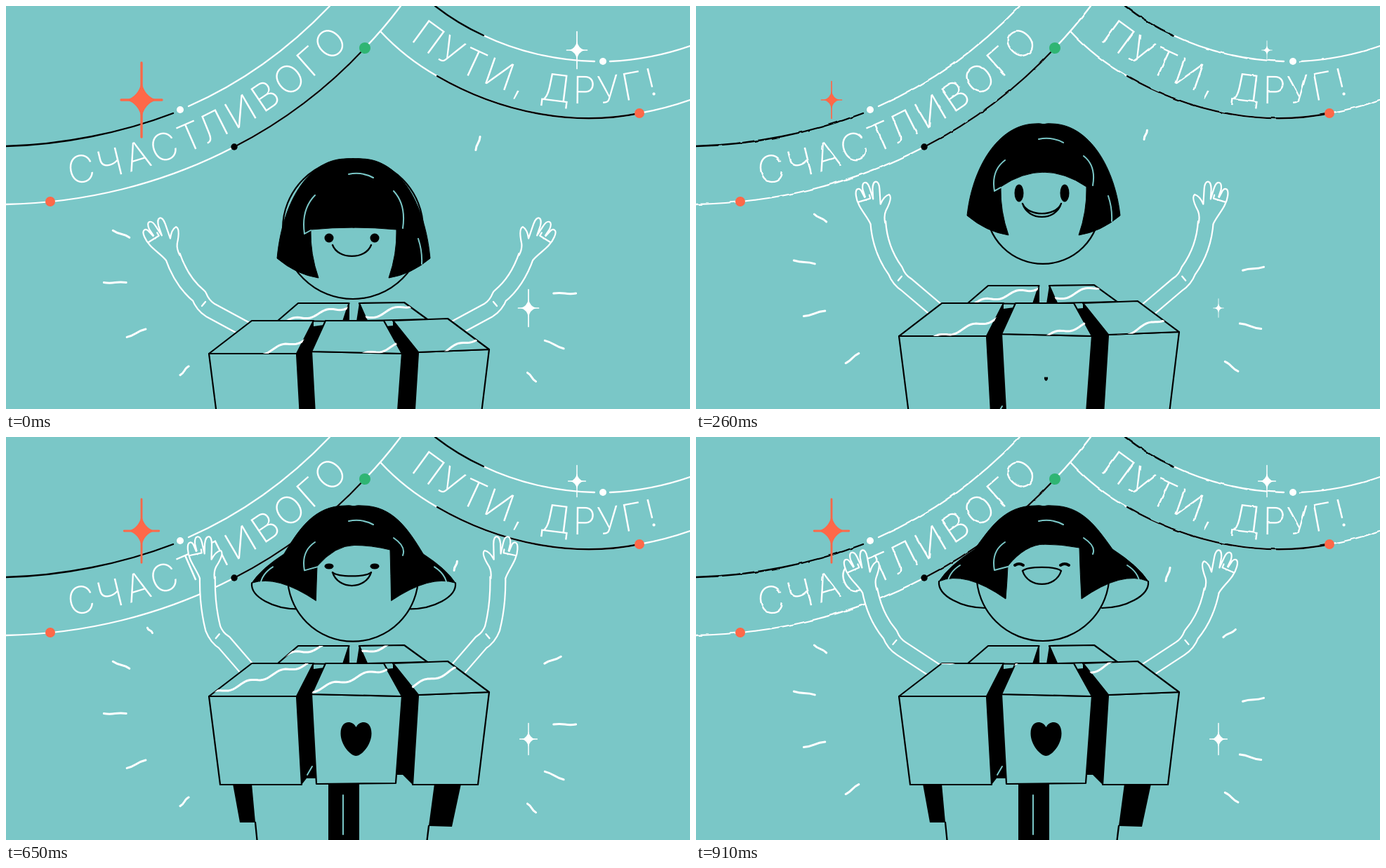
An HTML page for the animation above (1040 ms loop, 974 by 575 pixels).

```html
<!DOCTYPE html>
<html lang="ru">
<head>
<meta charset="utf-8">
<style>
  html, body { margin: 0; height: 100%; overflow: hidden; background: #7ac7c7; }
  svg { display: block; width: 100vw; height: 100vh; stroke-linecap: round; stroke-linejoin: round; }
  text { font: 200 54px Inter, Roboto, sans-serif; letter-spacing: 6.3px; fill: #fff; text-anchor: middle; }
  .w { fill: none; stroke: #fff; stroke-width: 2.3; }
  .b { fill: none; stroke: #000; stroke-width: 2.3; }
  .k { fill: #7ac7c7; stroke: #000; stroke-width: 2.2; }
  .t { fill: none; stroke: #7ac7c7; stroke-width: 2; }
  .hand { fill: #7ac7c7; stroke: #fff; stroke-width: 2.2; }
  .shine { fill: none; stroke: #fff; stroke-width: 3; }
  .arm { fill: none; stroke: #fff; stroke-width: 24; stroke-linecap: butt; }
  .arm.inner { stroke: #7ac7c7; stroke-width: 19.6; }
</style>
</head>
<body>
<svg viewBox="0 0 974 575">
  <defs>
    <filter id="wobble" filterUnits="userSpaceOnUse" x="0" y="0" width="974" height="575" color-interpolation-filters="sRGB">
      <feTurbulence type="fractalNoise" baseFrequency=".07" numOctaves="1" seed="4"/>
      <feDisplacementMap in="SourceGraphic" scale="3" xChannelSelector="R" yChannelSelector="G"/>
    </filter>
    <path id="leftLine" d="M0 283C110 281 222 255 325 201C395 165 457 118 511 60Q538 32 562 0"/>
    <path id="rightLine" d="M533 36C557 62 584 83 614 100C705 153 810 172 902 153Q940 146 974 134"/>
  </defs>
  <g id="garland">
    <use class="w" href="#leftLine"/>
    <use class="w" href="#rightLine"/>
    <path class="w" d="M260 143C335 110 402 62 461 0M680 42C728 65 784 78 838 79M860 79Q920 76 974 57"/>
    <path class="b" d="M0 200C80 198 165 181 238 153M325 201C395 165 457 118 511 60M614 100C705 153 810 172 902 153M611 0Q643 25 680 42"/>
    <text dy="-21"><textPath href="#leftLine" startOffset="332">СЧАСТЛИВОГО</textPath></text>
    <text dy="-21"><textPath href="#rightLine" startOffset="242">ПУТИ, ДРУГ!</textPath></text>
  </g>
  <circle cx="248" cy="148" r="5" fill="#fff"/>
  <circle cx="850" cy="79" r="5" fill="#fff"/>
  <circle cx="325" cy="201" r="4.7"/>
  <circle cx="63" cy="279" r="7" fill="#ff6848"/>
  <circle cx="902" cy="153" r="7" fill="#ff6848"/>
  <circle cx="511" cy="60" r="8" fill="#2fb573"/>
  <g id="scene"></g>
</svg>
<script>
const STEP = 130, STEPS = 8;
const { sin, cos, abs, PI } = Math;
const $ = id => document.getElementById(id);
const clamp = v => Math.max(0, Math.min(1, v));
const smooth = (from, to, v) => { const u = clamp((v - from) / (to - from)); return u * u * (3 - 2 * u); };
const path = (cls, d, extra = '') => `<path class="${cls}" d="${d}" ${extra}/>`;
const mirrored = (axis, part) => `<g transform="translate(${axis} 0) scale(-1 1)">${part}</g>`;

function sparkle(x, y, size, color, step) {
  const scale = size * (.5 + .5 * abs(cos(step * PI / 4)));
  return `<g transform="translate(${x} ${y}) scale(${scale})" fill="${color}" stroke="${color}" stroke-width="3.4">
    <path d="M0-53V53M-29 0H29"/>
    <path stroke="none" d="M0-26Q4-5 22 0Q4 5 0 26Q-4 5-22 0Q-4-5 0-26Z"/></g>`;
}

const dash = (x, y, angle, l) => path('shine', `M${-l / 2} 0q${l / 4}-1.2 ${l / 2} 0t${l / 2} 0`,
  `transform="translate(${x} ${y}) rotate(${angle})"`);

// Dashes climb an arc on each side, one place further every five steps.
const arcs = [
  { dir: -1, last: 3, turn: 14.8, bend: -.6, reach: 342, fall: 12 },
  { dir: 1, last: 2, turn: 9, bend: 1.7, reach: 308, fall: 4 }
];

function dashes(step) {
  const sway = cos(2 * PI * step / 7);
  let out = dash(646 + 26 * sway, 186 + 10 * sway, -72, 15 + 5 * sway);
  for (const { dir, last, turn, bend, reach, fall } of arcs) {
    let side = '';
    for (let k = -1; k <= last; k++) {
      const n = k + step / 5;
      if (n < -.25 || n > 4.05) continue;
      const a = (-22 + turn * n + bend * n * n) * PI / 180, r = reach - fall * (n - 2.7) ** 2;
      side += dash(r * cos(a), -r * sin(a), 46 - 23 * n, 32 - 4.5 * (n - 1.8) ** 2);
    }
    out += `<g transform="translate(490 425) scale(${dir} 1)">${side}</g>`;
  }
  return out;
}

// Arms swing in and back out once per loop.
function arms(step, drop) {
  const swing = sin(PI * step / STEPS), pull = swing ** 3;
  const angle = -19 + 22 * swing, r = angle * PI / 180;
  const wx = 237 + step + 57 * pull, wy = 230 - 34 * swing + drop;
  const ex = 280 + 25 * pull, ey = 299 - 16 * swing + drop;
  const d = `M${wx} ${wy}Q${wx - 40 * sin(r)} ${wy + 40 * cos(r)} ${ex - 5} ${ey - 11}Q${ex} ${ey + 2} ${ex + 11} ${ey + 9}L352 ${341 + drop}`;
  const arm = path('arm', d) + path('arm inner', d) + path('w', `M${ex - 1} ${ey + 3}l5-6`)
    + `<g class="hand" transform="translate(${wx} ${wy}) rotate(${angle})">
      <path d="M-11 3C-16-10-28-22-29-38C-30-50-23-50-20-42L-15-31L-19-46C-20-59-12-59-9-48L-5-32L-5-46C-4-60 5-60 5-46L5-24C9-32 13-36 18-37C22-34 18-24 12-14C9-8 9-4 10 3"/>
      <path d="M-26-29L-9-33L-10-38"/></g>`;
  return arm + mirrored(978 + 10 * swing, arm);
}

// Half of the hair below its top: crown controls, shoulder, flick, tip,
// lower control, inner end, fringe edge, end of the curl
const bob = [[66, 1], [102, 65], [109, 131], [109, 131], [109, 131], [82, 154], [50, 159], [61, 90], [60, 159]];
const curls = [[55, 0], [75, 30], [98, 62], [135, 86], [149, 108], [112, 92], [54, 133], [51, 86], [83, 146]];

function head(step) {
  const top = 98 + 120 * (1 - smooth(.4, 4, step));
  const nod = clamp(1 - step / 2), curl = clamp((step - 3) * .45);
  const points = bob.map((p, i) => p.map((v, j) => v + (curls[i][j] - v) * curl));
  const fringe = points[7], mid = 69 + 29 * nod - 14 * curl;
  for (const p of points.slice(2, 8)) p[1] += 11 * nod;
  const [c1, c2, shoulder, flick, tip, low, inner, , end] = points;

  const loop = curl ? path('k', `M${tip}C${tip[0] + 2} ${tip[1] + .55 * (end[1] - tip[1])} ${(tip[0] + end[0]) / 2} ${end[1]} ${end}`) : '';
  const lock = tilt => {
    const [x, y] = [fringe[0], fringe[1] - tilt];
    return `<path stroke="#000" d="M-1 1Q6-1 12 0C${c1} ${c2} ${shoulder}Q${flick} ${tip}Q${low} ${inner}Q${x + 1} ${(y + inner[1]) / 2} ${x} ${y}Q${x / 2} ${mid} -1 ${mid}Z"/>`
      + (curl ? path('t', `M${tip[0] - 12} ${tip[1] + 3}q-2-16-18-26`, 'stroke-width="3"') : '');
  };
  const [fx, fy] = fringe;
  const strands = path('t', `M-7 22q18-4 35 5M-55 52Q-75 ${fy / 2 + 22} -70 ${fy + 6}L${-fx} ${fy + 1}M57 46Q75 ${fy / 2 + 15} 70 ${fy - 2 - 15 * curl}`
    + (curl ? '' : `M92 ${tip[1] - 28}q6 18 5 36`));

  const radius = 81 + 19 * nod + 13.5 * curl;
  const eyeY = 99 + 14 * nod - 14 * curl, eyeSize = Math.max(4, 6.5 + 6 * sin(PI * step / 4));
  const eye = x => step > 5
    ? `<path d="M${x - 6} ${eyeY}q6-4 12 0" fill="none" stroke="#000" stroke-width="4"/>`
    : `<ellipse cx="${x}" cy="${eyeY}" rx="6.5" ry="${eyeSize}"/>`;
  const mouthY = 114 + 9 * nod - 21 * curl;
  const lower = mouthY + 1.33 * (19 - 3 * nod), upper = mouthY + 1.33 * (16 - .43 * step * step);

  return `<g transform="translate(495 ${top})">
    ${loop}${mirrored(0, loop)}
    <circle class="k" cx="-1" cy="${200 - 7 * curl - radius}" r="${radius}"/>
    ${lock(26 * curl)}${mirrored(0, lock(0))}${strands}${eye(-35)}${eye(30)}
    ${path('b', `M-30 ${mouthY}C-22 ${lower} 17 ${lower} 25 ${mouthY}C17 ${upper} -22 ${upper} -30 ${mouthY}`)}</g>`;
}

// Box lids; a wavy shine rises across each one with growing speed.
const lids = [
  { d: 'M387 323L416 298H488.5L480 324Z', x: 445, y: 313, slope: .25, speed: .5 },
  { d: 'M503 298L567 297L600 321L514 323Z', x: 540, y: 311, slope: .3, speed: .5 },
  { d: 'M350 323H438L414 370H289Z', x: 380, y: 364, slope: .32, speed: 1 },
  { d: 'M455 323H538L564 370L435 367Z', x: 500, y: 375, slope: .3, speed: 1.3 },
  { d: 'M551 323L629 320L688 364L587 368Z', x: 630, y: 364, slope: .4, speed: 1.15 }
];
document.querySelector('defs').insertAdjacentHTML('beforeend',
  lids.map(({ d }, i) => `<clipPath id="lid${i}"><path d="${d}"/></clipPath>`).join(''));

function lid({ d, x, y, slope, speed }, i, step) {
  const wave = [];
  for (let dx = -90; dx <= 72; dx += 3)
    wave.push(`${x + dx} ${(y - speed * step * step - slope * dx - 3 * sin(dx / 7.6)).toFixed(1)}`);
  return path('k', d) + path('shine', 'M' + wave.join('L'), `clip-path="url(#lid${i})"`);
}

function box(step, drop) {
  const tops = lids.map((l, i) => lid(l, i, step)), heart = clamp((step - 1.6) * .3);
  return `<g transform="translate(0 ${drop})">
    <path d="M323 495H350L355 550H333ZM610 495H648L635 556L602 555ZM459 494H503V590H459Z"/>
    ${path('b', 'M355 550L358 580M602 555L599 580')}${path('t', 'M480 511V567')}
    ${tops[0]}${tops[1]}
    <path d="M489 298L479 325H489ZM503 298L499 324H515Z"/>
    <path d="M438 323L414 370L421 496L428 487H443L435 367L453 329L438 331ZM538 323L564 370L556 482H565L579 496L588 368L551 323V330L541 331Z"/>
    ${path('t', 'M429 482L436 470')}
    ${path('k', 'M289 370H414L421 496H305ZM435 367L564 370L555 494L442 495ZM587 368L688 364L672 496H579Z')}
    ${tops.slice(2).join('')}
    <path transform="translate(498.5 431) scale(${heart})" d="M0-17C-5-27-22-28-22-8C-22 8-8 24 0 24C8 24 22 8 22-8C22-28 5-27 0-17Z"/>
  </g>`;
}

function draw(step) {
  const drop = 126 * (1 - smooth(.8, 5, step));
  if (step & 2) $('garland').setAttribute('filter', 'url(#wobble)');
  else $('garland').removeAttribute('filter');
  $('scene').innerHTML = sparkle(193, 134, 1, '#ff6848', step) + sparkle(813, 63, .5, '#fff', step)
    + sparkle(744, 431, .5, '#fff', step) + dashes(step) + arms(step, drop) + head(step) + box(step, drop);
}

let shown = -1;
function tick() {
  const step = Math.floor(performance.now() / STEP) % STEPS;
  if (step !== shown) draw(shown = step);
  requestAnimationFrame(tick);
}
tick();
</script>
</body>
</html>
```
